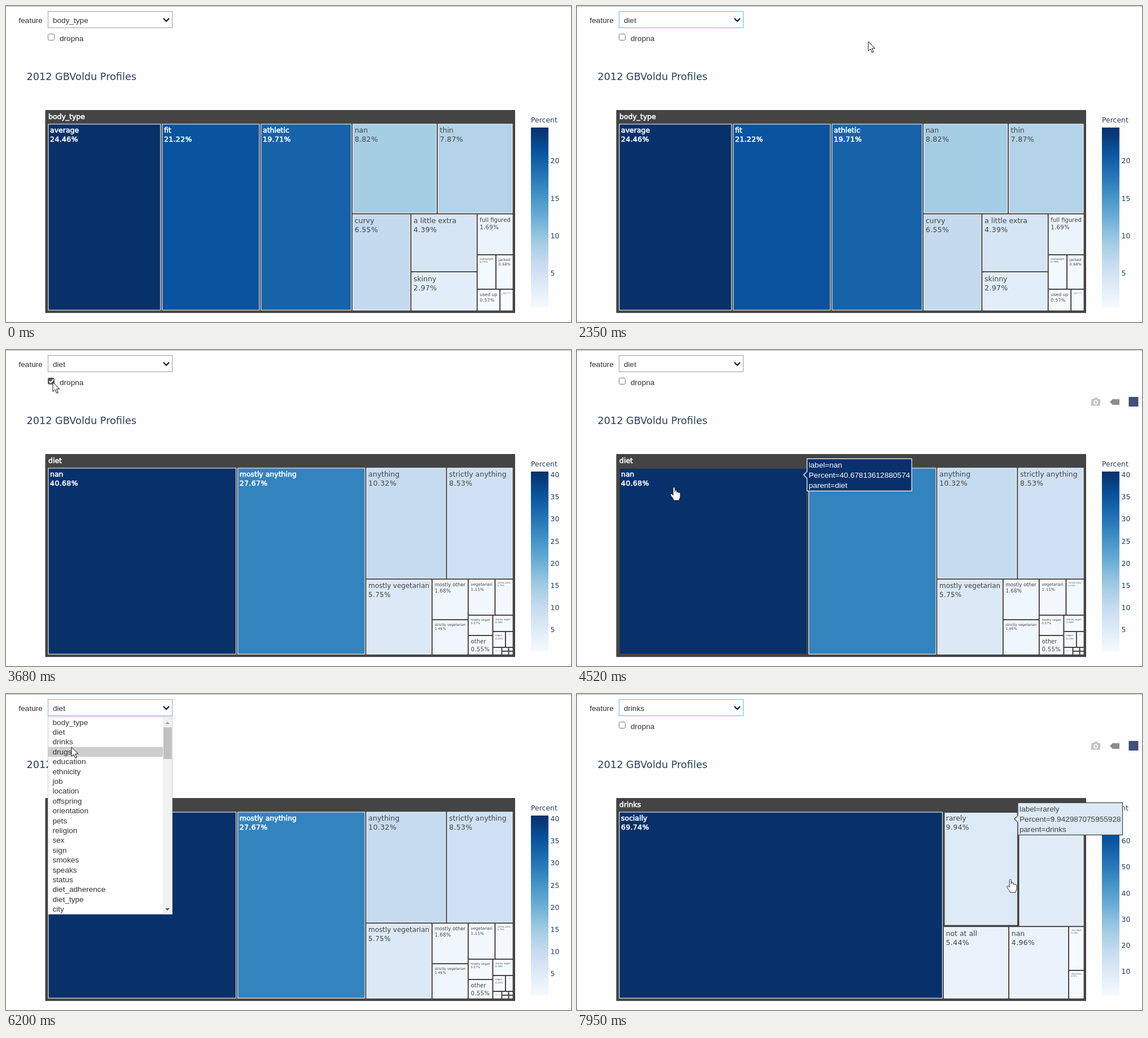
Write an HTML page that moves like this. It is 1001 px wide and 559 px high and loops after 8 s.

```html
<!DOCTYPE html>
<html lang="en">
<head>
<meta charset="utf-8">
<title>Profile treemap</title>
<style>
html, body { margin: 0; width: 100%; height: 100%; overflow: hidden; background: #fefefe; }
svg { display: block; width: 1001px; height: 559px; }
text { white-space: pre; }
.plot text { font-family: "DejaVu Sans", sans-serif; font-size: 12.48px; fill: #2a3f5f; }
.ui text, .tip text { font: 13.6px "Liberation Sans", Arial, sans-serif; fill: #333; }
.plot .lit { fill: #fff; stroke: #fff; stroke-width: .6px; }
.plot .dim { fill: #444; }
.pct { letter-spacing: .03em; }
</style>
</head>
<body>
<svg id="stage" viewBox="0 0 1001 559">
  <defs><linearGradient id="blues" x1="0" y1="1" x2="0" y2="0"></linearGradient></defs>
  <rect width="1001" height="1" fill="#b9b9b9"/>
  <g class="plot">
    <text x="36.5" y="131" style="font-size:17.68px">2012 GBVoldu Profiles</text>
    <g id="charts"></g>
  </g>
  <g id="bar">
    <path fill="#c3c4c6" fill-rule="evenodd" d="M911 87h4l1.500-2.500h5.500l1.500 2.500h3.500v11.500h-16zM919 88.500a4 4 0 1 0 .01 0zM919 90.300a2.200 2.200 0 1 1-.01 0z"/>
    <path fill="#8c8c8c" d="M944 92l5-5h12v10h-12z"/>
    <rect x="977.500" y="83" width="17" height="17" fill="#3f4f75"/>
  </g>
  <g class="tip" id="tip">
    <path stroke-width="1.200"/>
    <text></text><text></text><text></text>
  </g>
  <g class="ui">
    <text x="22.500" y="30">feature</text>
    <rect id="box" x="74.500" y="9.500" width="220" height="29" fill="#fff"/>
    <text id="value" x="83" y="30"></text>
    <path d="M279 22l5 5 5-5" fill="none" stroke="#111" stroke-width="2.200"/>
    <rect id="check" x="74.500" y="49.500" width="11" height="11" rx="2"/>
    <path id="tick" d="M76.500 55l2.700 3 5-6" fill="none" stroke="#fff" stroke-width="2"/>
    <text x="95" y="62">dropna</text>
    <g id="list">
      <rect x="74.500" y="40.500" width="220" height="349" fill="#fff" stroke="#ccc"/>
      <rect id="row" x="75" width="203" height="17.400" fill="#cdcdcd"/>
      <g id="items"></g>
      <rect x="278" y="41" width="16" height="348" fill="#f1f1f1"/>
      <rect x="279" y="59" width="14.500" height="56" fill="#c1c1c1"/>
      <path d="M282 53l4-4 4 4z" fill="#a3a3a3"/>
      <path d="M282 379l4 4 4-4z" fill="#505050"/>
    </g>
  </g>
  <path id="arrow" d="M0 0V16.500L4 13L6.800 19.300L9.300 18.200L6.600 12H12z" fill="#fff" stroke="#111"/>
  <path id="hand" d="M-1.800 11V1.500C-1.800-.5 1.500-.5 1.500 1.500V8C2-.0 5 7 5 9C5.500 7.500 8 7.700 8 9.800C8.500 8.500 11 8.700 11 11V16C11 19 9 20 9 23H-.5C-1 20-4 17.500-6 14C-7 11.500-4 10.500-3 12.500L-1.800 14z" fill="#fff" stroke="#222"/>
</svg>
<script>
const $ = id => document.getElementById(id);
const show = (el, on) => el.style.display = on ? '' : 'none';
const set = (el, o) => { for (const k in o) el.setAttribute(k, o[k]); };
const PAD = 3.12, SIZE = 12.48;

const blues = [[247,251,255], [222,235,247], [198,219,239], [158,202,225], [107,174,214],
               [66,146,198], [33,113,181], [8,81,156], [8,48,107]];
const shade = u => {
  const p = Math.max(0, Math.min(1, u)) * 8, i = Math.min(7, Math.floor(p));
  return `rgb(${blues[i].map((c, k) => Math.round(c + (blues[i + 1][k] - c) * (p - i)))})`;
};
$('blues').innerHTML = blues.map((c, i) => `<stop offset="${i / 8}" stop-color="rgb(${c})"/>`).join('');

const ctx = document.createElement('canvas').getContext('2d');
const measure = (s, font) => { ctx.font = font; return ctx.measureText(s).width; };

// Squarified treemap, gaps taken from each cell afterwards
function squarify(nodes, x0, y0, x1, y1) {
  let left = nodes.reduce((s, n) => s + n.v, 0), i = 0;
  while (i < nodes.length) {
    const dx = x1 - x0, dy = y1 - y0, alpha = Math.max(dx / dy, dy / dx) / left;
    let sum = 0, best = Infinity, j = i;
    for (; j < nodes.length; j++) {
      const s = sum + nodes[j].v, beta = s * s * alpha;
      const worst = Math.max(nodes[i].v / beta, beta / nodes[j].v);
      if (worst > best) break;
      best = worst;
      sum = s;
    }
    const flat = dx < dy, depth = (flat ? dy : dx) * sum / left;
    let pos = flat ? x0 : y0;
    for (const n of nodes.slice(i, j)) {
      const len = (flat ? dx : dy) * n.v / sum;
      const [x, y, w, h] = flat ? [pos, y0, len, depth] : [x0, pos, depth, len];
      Object.assign(n, { x: x + PAD / 2, y: y + PAD / 2, w: w - PAD, h: h - PAD });
      pos += len;
    }
    if (flat) y0 += depth; else x0 += depth;
    left -= sum;
    i = j;
  }
}

function chart(name, nodes) {
  squarify(nodes, 73.4, 207.4, 898.6, 539.6);
  const max = nodes[0].v, min = nodes[nodes.length - 1].v, span = max - min;
  let s = '<rect x="69.5" y="184" width="832.500" height="359" fill="#444"/>' +
    `<text class="lit" x="75" y="199.500">${name}</text>`;
  for (const n of nodes) {
    const u = (n.v - min) / span, pct = n.v.toFixed(2) + '%', font = SIZE + 'px "DejaVu Sans"';
    n.fill = shade(u);
    n.dark = u > .5;
    const wide = Math.max(measure(n.label, font), measure(pct, font) + .03 * SIZE * pct.length);
    const size = SIZE * Math.max(.02, Math.min(1, (n.w - 2 * PAD) / wide, (n.h - 2 * PAD) / 31));
    const line = (t, y, c) => `<text class="${n.dark ? 'lit' : 'dim'} ${c}" x="${n.x + PAD}" y="${y}" style="font-size:${size}px">${t}</text>`;
    const base = n.y + PAD + .95 * size;
    s += `<rect class="cell" x="${n.x}" y="${n.y}" width="${n.w}" height="${n.h}" fill="${n.fill}" stroke="#fff" stroke-width="1.040"/>` +
      line(n.label, base, '') + line(pct, base + 1.3 * size, 'pct');
  }
  s += '<text x="930" y="206">Percent</text><rect x="930" y="215" width="31" height="319" fill="url(#blues)"/>';
  const step = span / 8.7 > 5 ? 10 : 5;
  for (let v = step; v <= max; v += step)
    s += `<text x="964.500" y="${534 - (v - min) / span * 319 + 4.5}">${v}</text>`;
  const g = document.createElementNS('http://www.w3.org/2000/svg', 'g');
  g.innerHTML = s;
  $('charts').append(g);
  return { name, nodes, g, cells: g.querySelectorAll('.cell') };
}

const parse = s => s.split(',').map(p => {
  const [, label, v] = p.trim().match(/^(.*) (\S+)$/);
  return { label, v: +v };
});
const diet = 'nan 40.67813612880574, mostly anything 27.66904318255731, anything 10.32, strictly anything 8.53, ' +
  'mostly vegetarian 5.75, mostly other 1.68, strictly vegetarian 1.46, vegetarian 1.11, strictly other .75, ' +
  'mostly vegan .57, other .55, strictly vegan .38, vegan .23, mostly kosher .14, mostly halal .08, ' +
  'strictly halal .03, strictly kosher .03, halal .02, kosher .02';
const known = parse(diet).slice(1), total = known.reduce((s, n) => s + n.v, 0);
known.forEach(n => n.v *= 100 / total);
const charts = {
  body: chart('body_type', parse('average 24.45932799572907, fit 21.21923937360179, athletic 19.71301254337603, nan 8.82, ' +
    'thin 7.87, curvy 6.55, a little extra 4.39, skinny 2.97, full figured 1.69, overweight .74, jacked .68, ' +
    'used up .57, rather not say .33')),
  diet: chart('diet', parse(diet)),
  known: chart('diet', known),
  drinks: chart('drinks', parse('socially 69.74236142551388, rarely 9.942987075955928, often 8.63, not at all 5.44, ' +
    'nan 4.96, very often .78, desperately .51'))
};

const items = ('body_type diet drinks drugs education ethnicity job location offspring orientation pets ' +
  'religion sex sign smokes speaks status diet_adherence diet_type city').split(' ');
const ROW = 17.4, TOP = 41.5;
$('items').innerHTML = items.map((t, i) => `<text x="82.500" y="${TOP + ROW * i + 13}">${t}</text>`).join('');

// Timed states: [start, value]
const at = (list, t) => list.reduce((v, [s, x]) => t >= s ? x : v, null);
const view = [[0, 'body'], [2450, 'diet'], [3750, 'known'], [4150, 'diet'], [6950, 'drinks']];
const picked = [[0, 'body_type'], [1750, 'diet'], [6550, 'drinks']];
const open = [[0, 0], [970, 1], [1750, 0], [5100, 1], [6550, 0]];
const focus = [[0, 0], [970, 1], [3450, 0], [5100, 1]];
const ticked = [[0, 0], [3450, 1], [3950, 0]];
const path = [[100, 430, 500], [300, 400, 400], [550, 340, 260], [700, 300, 120], [870, 274, 30], [1050, 274, 30],
  [1500, 120, 70], [1750, 114, 68], [1850, 120, 68], [2350, 516, 63], [2560, 516, 63], [2950, 290, 22],
  [3360, 83, 57], [4200, 83, 57], [4500, 172, 243], [4680, 172, 243], [5020, 190, 23], [5150, 190, 23],
  [5550, 140, 130], [5850, 122, 112], [6200, 116, 94], [6450, 112, 83], [6720, 112, 83], [7500, 520, 330],
  [7600, 545, 332], [7900, 768, 328]];

function pointer(t) {
  if (t < path[0][0]) return null;
  const i = path.findIndex(p => p[0] > t);
  if (i < 0) return path[path.length - 1].slice(1);
  const [a, b] = [path[i - 1], path[i]];
  const u = (t - a[0]) / (b[0] - a[0]), e = u * u * (3 - 2 * u);
  return [a[1] + (b[1] - a[1]) * e, a[2] + (b[2] - a[2]) * e];
}

function drawTip(c, n) {
  const lines = ['label=' + n.label, 'Percent=' + n.v, 'parent=' + c.name];
  const ink = n.dark ? '#fff' : '#444', x = n.x + n.w - 6, y = n.y + 12;
  const w = Math.max(...lines.map(s => measure(s, '13.6px "Liberation Sans"'))) + 6;
  const [shape, ...rows] = $('tip').children;
  set(shape, { d: `M${x} ${y}l6-6v-22.500h${w}v57h-${w}v-22.500z`, fill: n.fill, stroke: ink });
  rows.forEach((r, i) => {
    set(r, { x: x + 9, y: y - 12.5 + 17.7 * i });
    r.style.fill = ink;
    r.textContent = lines[i];
  });
}

function draw(t) {
  const p = pointer(t), c = charts[at(view, t)], isOpen = at(open, t), on = at(ticked, t), value = at(picked, t);
  for (const k in charts) show(charts[k].g, charts[k] === c);

  const inPlot = p && !isOpen && p[1] > 88;
  const hit = inPlot ? c.nodes.findIndex(n => p[0] >= n.x && p[0] <= n.x + n.w && p[1] >= n.y && p[1] <= n.y + n.h) : -1;
  c.cells.forEach((el, i) => set(el, i === hit ? { stroke: '#444', 'stroke-width': 2.08 } : { stroke: '#fff', 'stroke-width': 1.04 }));
  show($('bar'), inPlot);
  show($('tip'), hit >= 0);
  if (hit >= 0) drawTip(c, c.nodes[hit]);

  $('value').textContent = value;
  set($('box'), { stroke: at(focus, t) ? '#64b5f6' : '#9e9e9e' });
  set($('check'), { fill: on ? '#555' : '#fff', stroke: on ? '#555' : '#767676' });
  show($('tick'), on);
  show($('list'), isOpen);
  if (isOpen) {
    const row = p[1] > TOP ? Math.floor((p[1] - TOP) / ROW) : items.indexOf(value);
    set($('row'), { y: TOP + ROW * row });
  }

  show($('arrow'), p && hit < 0);
  show($('hand'), hit >= 0);
  if (p) set($(hit < 0 ? 'arrow' : 'hand'), { transform: `translate(${p})` });
}

(function loop() {
  draw(performance.now() % 8000);
  requestAnimationFrame(loop);
})();
</script>
</body>
</html>
```
